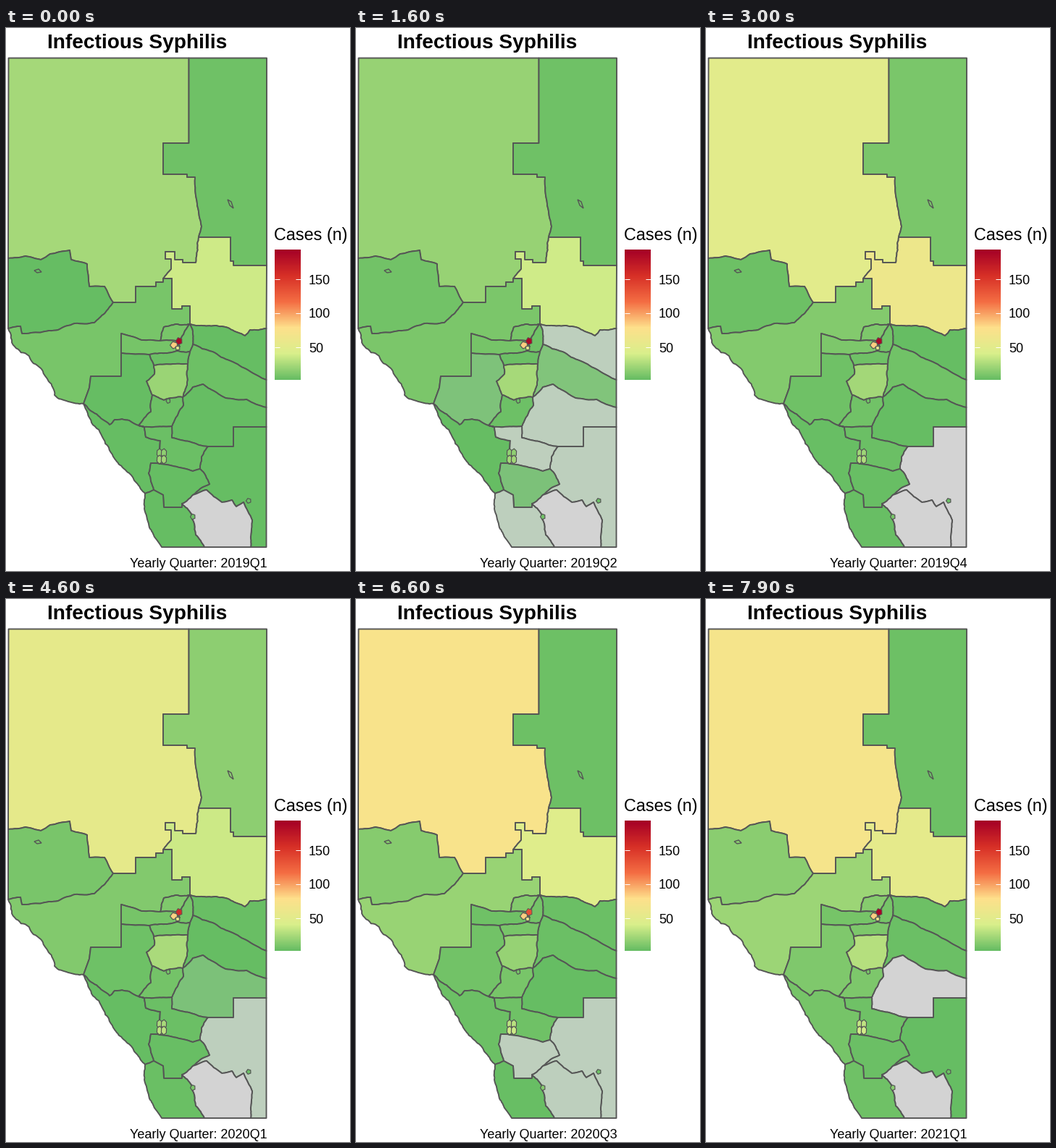
Recreate the animation shown at these times as a matplotlib script. Size 475 by 750 pixels, loop 8000 ms.

```python
import random

import matplotlib.pyplot as plt
import numpy as np
from matplotlib.animation import FuncAnimation
from matplotlib.colors import LinearSegmentedColormap, to_rgb
from matplotlib.patches import Polygon

W, H, DPI = 475, 750, 100
STEP, LOOP = 100, 8000
STARTS = [*range(600, 7000, 1000), 7500]
QUARTERS = [f"{2019 + i // 4}Q{i % 4 + 1}" for i in range(9)]
LOW, HIGH = 1.5, 193.5
GREY = np.array(to_rgb("lightgrey"))
LINE = "#555555"
CMAP = LinearSegmentedColormap.from_list(
    "cases", ["#66bd63", "#d9ef8b", "#fee08b", "#f46d43", "#d73027", "#a50026"])

plt.rcParams["font.family"] = "Liberation Sans"
fig = plt.figure(figsize=(W / DPI, H / DPI), dpi=DPI, facecolor="white")
ax = fig.add_axes([0, 0, 1, 1])


def px(size):
    return size * 72 / DPI


# Borders: every line is drawn once and shared by the areas on both sides.
arcs = {"top_left": [(3.5, 41.5)], "top_right": [(360, 41.5)],
        "bottom_right": [(359.5, 717)]}


def wander(a, b, rng, rough):
    """Split a segment by midpoint displacement."""
    (x0, y0), (x1, y1) = a, b
    if np.hypot(x1 - x0, y1 - y0) < 4:
        return [b]
    d = rng.uniform(-rough, rough)
    mid = ((x0 + x1) / 2 + (y0 - y1) * d, (y0 + y1) / 2 + (x1 - x0) * d)
    return wander(a, mid, rng, rough) + wander(mid, b, rng, rough)


def natural(name, *points, rough=0.07):
    rng = random.Random(name)
    arcs[name] = [points[0]]
    for a, b in zip(points, points[1:]):
        arcs[name] += wander(a, b, rng, rough)


def survey(name, x, y, *turns):
    """Right-angled line: turns alternate between a new y and a new x."""
    arcs[name] = [(x, y)]
    for i, turn in enumerate(turns):
        x, y = (turn, y) if i % 2 else (x, turn)
        arcs[name].append((x, y))


survey("nw_ne", 252.5, 41.5, 159, 217, 202, 250, 206, 261)
natural("nw_ne2", (261, 206), (264, 245), (270, 274), (266, 289), rough=0.04)
survey("ne_y", 266, 289, 289, 310, 322, 314, 328, 360)
natural("nw_y", (266, 289), (262, 324))
survey("nw_y2", 262, 324, 324, 244, 320, 233, 309, 220, 319, 228, 333)
natural("nw_y3", (228, 333), (217, 346))
survey("nw_cw", 217, 346, 351, 207, 357, 179, 379, 148)
natural("nw_w", (148, 379), (136, 357), (115, 357), (112, 326), (90, 320),
        (88, 307), (61, 312), (48, 320), (27, 315), (3, 318), rough=0.04)
natural("w_cw", (148, 379), (122, 407), (95, 408), (72, 417), (22, 422),
        (20, 412), (3, 415), rough=0.05)
survey("y_cw", 217, 346, 346, 229, 388, 243, 384, 254, 409)
natural("y_ea", (254, 409), (290, 411), (330, 425), (337, 417), (359.5, 415))
natural("cw_n", (254, 409), (235, 409), (218, 413), (213, 432))
natural("cw_b", (213, 432), (187, 431), (159, 422), rough=0.03)
natural("cw_r", (159, 449), (159, 481), (117, 481), (115, 497), (107, 519),
        rough=0)
natural("n_b", (213, 432), (236, 432))
natural("n_e1", (236, 432), (242, 428), (254, 409))
natural("e1_ea", (254, 409), (258, 419), (258, 437))
natural("e1_eb", (258, 437), (254, 447))
natural("e1_b", (236, 432), (240, 440), (236, 446))
natural("e1_l", (254, 447), (236, 446))
natural("b_l", (236, 446), (220, 449), (198, 451))
natural("b_r", (198, 451), (159, 449), rough=0.02)
natural("l_r", (198, 451), (204, 466))
natural("l_rd", (204, 466), (251, 464), rough=0.04)
natural("l_eb", (254, 447), (251, 464))
natural("rd_eb", (251, 464), (250, 493), (244, 510))
natural("rd_o", (244, 510), (218, 514), (202, 507))
natural("rd_r", (204, 466), (205, 478), (194, 488), (202, 507))
natural("r_o", (202, 507), (200, 530), (183, 549))
natural("r_m", (107, 519), (143, 548), (150, 541), (170, 542), (183, 549))
natural("ea_eb", (258, 437), (285, 447), (335, 473), (359.5, 486), rough=0.05)
natural("eb_ec", (244, 510), (258, 496), (272, 492), (303, 511), (332, 513),
        (359.5, 524), rough=0.05)
natural("o_ec", (244, 510), (245, 521), (229, 550))
natural("o_p", (183, 549), (191, 551), (229, 550), rough=0.04)
natural("p_ec", (229, 550), (229, 566), (279, 578), rough=0.05)
survey("ec_ed", 279, 578, 578, 314, 551, 359.5)
natural("m_p", (191, 551), (193, 565), (213, 570), (212, 602), rough=0.04)
natural("p_ed", (279, 578), (270, 592), (268, 609))
natural("p_q", (212, 602), (258, 612), (268, 609), rough=0.03)
natural("q_ed", (268, 609), (281, 630), (258, 645))
natural("m_q", (212, 602), (200, 601), (197, 615), (204, 638))
natural("m_s", (204, 638), (192, 643))
natural("q_s", (204, 638), (217, 645), (218, 662), (243, 662), (243, 657),
        rough=0)
natural("q_t", (258, 645), (243, 657))
natural("t_ed", (258, 645), (277, 638), (298, 655), (312, 652), (318, 661),
        (328, 655), (340, 680), (338, 717), rough=0.05)
natural("t_s", (243, 657), (256, 671), (262, 700), (274, 717))
natural("coast_a", (3, 415), (12, 440), (48, 470), (67, 507), (107, 519),
        rough=0.12)
natural("coast_b", (107, 519), (118, 545), (148, 592), (192, 643), rough=0.1)
natural("coast_c", (192, 643), (198, 690), (215, 717), rough=0.1)


# Areas
def trend(start, end, events=None, hidden=()):
    """Eased growth over the quarters; hidden quarters have no value."""
    u = np.linspace(0, 1, len(QUARTERS))
    cases = start + (end - start) * u * u * (3 - 2 * u)
    for quarter, change in (events or {}).items():
        cases[quarter] += change
    return [GREY if q in hidden
            else np.array(CMAP((c - LOW) / (HIGH - LOW))[:3])
            for q, c in enumerate(cases)]


areas = []


def shape(points, colors, width):
    patch = Polygon(points, closed=True, ec=LINE, lw=px(width),
                    joinstyle="round")
    ax.add_patch(patch)
    areas.append((patch, colors))


def region(path, start, end, events=None, hidden=()):
    """Join named borders (a leading minus reverses one) into one area."""
    points = []
    for name in path.split():
        points += arcs[name[1:]][::-1] if name[0] == "-" else arcs[name]
    shape(points, trend(start, end, events, hidden), 1.9)


def town(x, y, rx, ry, sides, *cases, width=1.2):
    a = np.linspace(0, 2 * np.pi, sides, endpoint=False) + 0.6
    shape(np.column_stack([x + rx * np.cos(a), y + ry * np.sin(a)]),
          trend(*cases), width)


region("top_left nw_ne nw_ne2 nw_y nw_y2 nw_y3 nw_cw nw_w", 19, 69,
       {0: 4, 1: -5, 3: 15, 4: 13, 5: -16, 6: 12})
region("top_right nw_ne nw_ne2 ne_y", 5, 4, {3: 4, 4: 13})
region("-nw_y3 -nw_y2 -nw_y ne_y -y_ea -y_cw", 36, 53,
       {3: 19, 4: -7, 5: -20, 6: -6})
region("nw_w -w_cw", 2, 14, {1: 4, 3: -2})
region("-w_cw -nw_cw y_cw cw_n cw_b -cw_n -cw_n cw_b cw_r -coast_a"
       .replace("-cw_n -cw_n cw_b ", ""), 8, 20, {4: -4})
region("cw_n n_b n_e1", 8, 12)
region("cw_b -b_r -b_l -e1_b -n_b", 7, 7, {3: 2, 6: -3})
region("n_e1 e1_ea e1_eb e1_l -e1_b", 5, 7)
region("y_ea -ea_eb -e1_ea", 1, 4, hidden={1})
region("e1_eb l_eb rd_eb eb_ec -ea_eb", 4, 3, {3: 2, 4: -2, 5: -2}, {2})
region("eb_ec -ec_ed -p_ec -o_ec", 2, 1, hidden={1, 5, 8})
region("ec_ed bottom_right -t_ed -q_ed -p_ed", 2, 1, hidden={1, 3, 4, 6})
region("b_l l_r l_rd -l_eb e1_l", 3, 9)
region("b_r cw_r r_m -r_o -rd_r -l_r", 2, 10, {4: -1, 5: -4, 6: -4}, {2})
region("l_rd rd_eb rd_o -rd_r", 19, 28, {1: 4, 4: 2, 5: -7, 6: -11})
region("rd_o r_o o_p -o_ec", 4, 9)
region("r_m o_p m_p m_q m_s -coast_b".replace("o_p ", ""), 1, 7,
       {4: -3, 5: -4, 6: -3})
region("o_p p_ec p_ed p_q -m_p".replace("p_ed p_q", "p_ed -p_q"),
       3, 5, {5: -3}, {1})
region("m_q q_s -q_t -q_ed -p_q", 2, 3, hidden={2, 6})
region("m_s coast_c -t_s -q_s", 1, 5, {5: -3, 6: -3}, {1})
region("q_t t_s -t_ed", 2, 2, hidden=set(range(9)) - {7})

town(232, 438, 5.5, 5, 5, 84, 84, {5: -8})
town(237, 442, 3.5, 3.5, 4, 50, 64)
town(239, 432.5, 4.8, 5.2, 5, 187, 190, {4: -22, 5: -60, 6: -58, 7: -38},
     width=0.9)
for i, x in enumerate((212, 218)):
    for j, y in enumerate((587, 596)):
        town(x, y, 4, 6, 6, 15 + 6 * j, 32 + 6 * j)
town(335, 653, 3.5, 3.5, 5, 3, 4)
town(258, 675, 3.5, 4, 5, 5, 14)
town(224, 515, 3, 3.5, 5, 4, 8)

for x, y, dx, dy in ((310, 243, 4, 6), (44, 336, 5, 1)):
    lake = [(x - dx, y - dy), (x + 1, y - 3), (x + dx, y + dy),
            (x - 1, y + 2)]
    ax.add_patch(Polygon(lake, fill=False, ec=LINE, lw=px(1.4)))

# Legend and text
ax.imshow(np.linspace(1, 0, 256)[:, None], cmap=CMAP, aspect="auto",
          extent=(371, 407, 486, 306), interpolation="bilinear")
for tick in (50, 100, 150):
    y = 441 - (tick - 50) * 0.94
    for x in (371, 400):
        ax.plot([x, x + 7], [y, y], color="white", lw=px(1),
                solid_capstyle="butt")
    ax.text(418, y + 6.5, str(tick), fontsize=px(18))
ax.text(370.5, 293, "Cases (n)", fontsize=px(23.4))
ax.text(181, 28, "Infectious Syphilis", fontsize=px(28), weight="bold",
        ha="center")
caption = ax.text(360.5, 745, "", fontsize=px(18), ha="right")
ax.set(xlim=(0, W), ylim=(H, 0))
ax.axis("off")


def update(frame):
    t = frame * STEP
    position = sum(min(max((t - s) // STEP + 1, 0), 5) for s in STARTS)
    state, step = divmod(position, 5)
    mix = step / 5
    following = min(state + 1, len(QUARTERS) - 1)
    for patch, colors in areas:
        patch.set_facecolor((1 - mix) * colors[state]
                            + mix * colors[following])
    nearest = following if mix > 0.5 else state
    caption.set_text(f"Yearly Quarter: {QUARTERS[nearest]}")
    return [caption] + [patch for patch, _ in areas]


anim = FuncAnimation(fig, update, frames=LOOP // STEP, interval=STEP,
                     repeat=True, repeat_delay=0, blit=False)
plt.show()
```
